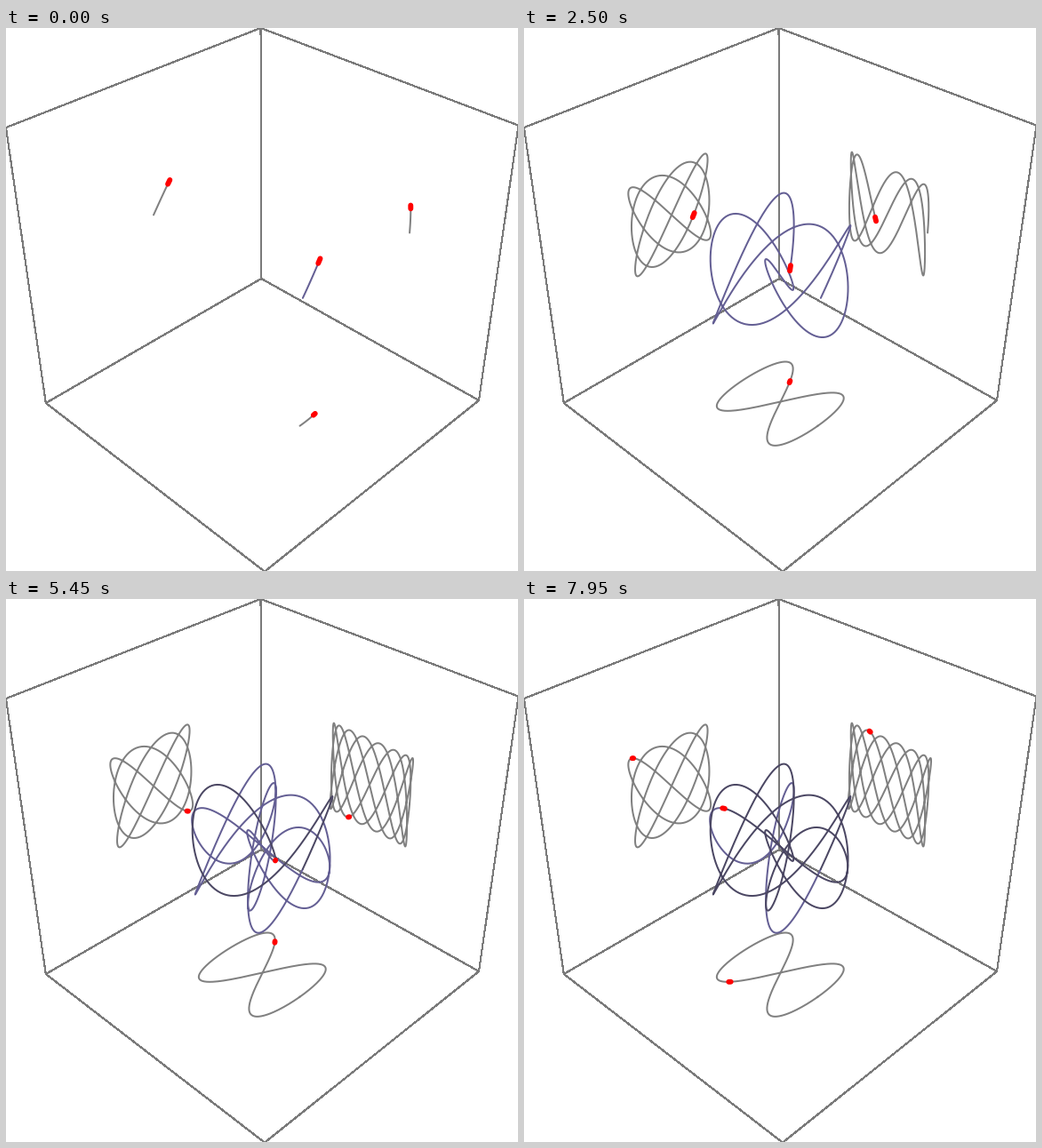
Write a matplotlib script that moves like this. It is 576x611 px and loops after 8000 ms.

```python
import numpy as np
import matplotlib.pyplot as plt
from matplotlib.animation import FuncAnimation

W, H, DPI = 576, 611, 64
FRAMES, INTERVAL = 160, 50
STEP = np.pi / 15        # curve parameter per frame
PERIOD = 6 * np.pi       # the space curve closes after this
HEAD = 0.032             # length of the red marker along the curve

# Screen positions of the room's corners
BACK, TOP = (287.2, 282), (286.5, 0)
LEFT, RIGHT = (44.8, 422), (532, 419)
LEFT_TOP, RIGHT_TOP, FRONT = (0, 112), (576.5, 109.6), (291, 611.6)

# Perspective: screen = (o + M p) / (1 + k.p), p in the unit cube
K = np.array([-0.1371, -0.1358, -0.132])
ORIGIN = np.array(BACK, float)
AXES = np.array([np.array(c) * (1 + k) - ORIGIN
                 for c, k in zip((LEFT, RIGHT, TOP), K)])


def project(p):
    return ((ORIGIN + p @ AXES) / (1 + p @ K)[:, None]).T


def curve(t):
    xyz = np.stack([-np.sin(2 * t), np.cos(t), np.sin(8 * t / 3)], axis=1)
    return 0.5 + xyz / 6


def flatten(p, axis):
    """Shadow of the points on the wall where the given axis is zero."""
    q = p.copy()
    q[:, axis] = 0
    return q


def span(a, b):
    return np.linspace(a, b, max(2, int((b - a) * 60)))


fig = plt.figure(figsize=(W / DPI, H / DPI), dpi=DPI, facecolor="white")
ax = fig.add_axes([0, 0, 1, 1])
ax.set_xlim(0, W)
ax.set_ylim(H, 0)
ax.axis("off")


def stroke(color, px, z, pts=((), ()), smooth=True):
    line, = ax.plot(*pts, color=color, lw=px * 72 / DPI, zorder=z,
                    solid_capstyle="round", solid_joinstyle="round",
                    antialiased=smooth)
    return line


for path in ([LEFT, BACK, RIGHT], [BACK, TOP],
             [TOP, LEFT_TOP, LEFT, FRONT], [TOP, RIGHT_TOP, RIGHT, FRONT]):
    stroke("#7a7a7a", 1.04, 1, np.array(path, float).T, smooth=False)

# Each shadow closes after its own period
shadows = [(axis, loop, stroke("#808080", 2, 2), stroke("#ff0000", 5.9, 3))
           for axis, loop in enumerate((PERIOD, PERIOD / 2, PERIOD / 3))]
trail = stroke("#645f94", 2, 4)
retrace = stroke("#4b4763", 2, 5)
marker = stroke("#ff0000", 5.9, 6)


def draw(i):
    t = (i + 1) * STEP
    head = curve(np.linspace(t, t + HEAD, 6))
    for axis, loop, line, dot in shadows:
        tail = curve(span(0, min(t, loop)))
        line.set_data(*project(flatten(tail, axis)))
        dot.set_data(*project(flatten(head, axis)))
    trail.set_data(*project(curve(span(max(0, t - PERIOD), min(t, PERIOD)))))
    marker.set_data(*project(head))
    if t > PERIOD:
        retrace.set_data(*project(curve(span(0, t - PERIOD))))
    else:
        retrace.set_data([], [])
    return [trail, retrace, marker]


anim = FuncAnimation(fig, draw, frames=FRAMES, interval=INTERVAL,
                     init_func=lambda: draw(0), repeat=True, repeat_delay=0,
                     cache_frame_data=False)
plt.show()
```
